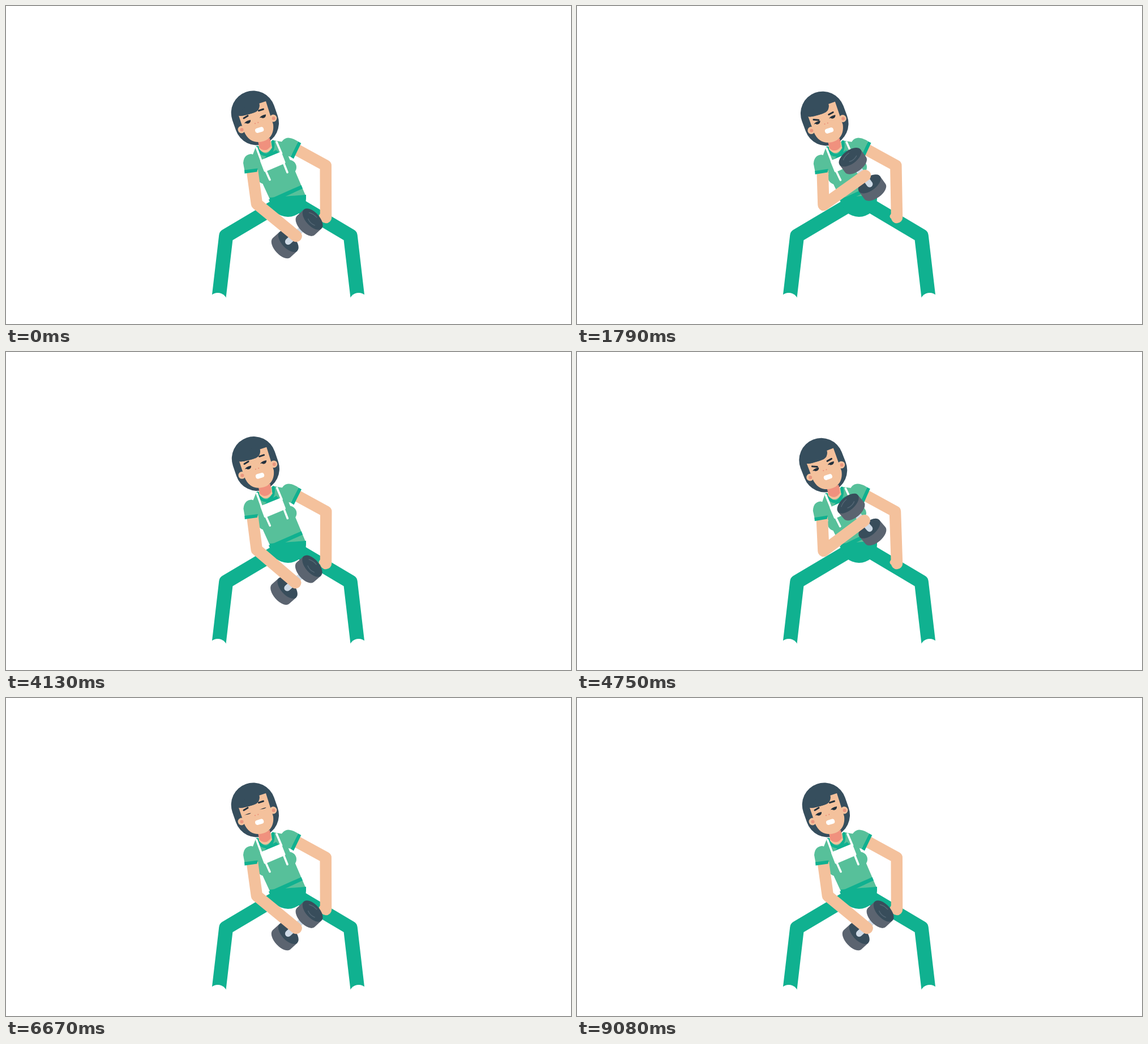
Write an HTML page that moves like this. It is 998x561 px and loops after 9960 ms.

```html
<!DOCTYPE html>
<html lang="en">
<head>
<meta charset="utf-8">
<title>Dumbbell curl</title>
<style>
  html, body { margin: 0; width: 100%; height: 100%; overflow: hidden; background: #fff; }
  svg { display: block; width: 998px; height: 561px; }
  .hair { fill: #364e5d; }
  .skin { fill: #f4c19c; }
  .shirt { fill: #57c09a; }
  .green { fill: #10b190; }
  .white { fill: #fff; }
  .limb { fill: none; stroke-linecap: round; stroke-linejoin: round; }
  .arm { stroke: #f4c19c; stroke-width: 20.5; }
  .leg { stroke: #10b190; stroke-width: 25; stroke-linecap: butt; }
  .strap { stroke: #fff; stroke-width: 3.6; }
  .brow { stroke: #24313d; stroke-width: 3; }
</style>
</head>
<body>
<svg viewBox="0 0 998 561">
  <defs>
    <g id="leg">
      <path class="limb leg" d="M376 514 388.7 405.5 484 349"/>
      <circle class="white" cx="374" cy="523" r="17"/>
    </g>
    <g id="weight">
      <path fill="#5b6470" d="M-23-8V8.5A23 12 0 0 0 23 8.5V-8z"/>
      <ellipse cy="-8" rx="23" ry="12" fill="#384d5b"/>
    </g>
    <path id="eye" fill="#24313d" d="M-6.8.8Q-4-3 5.5-2.4 5 2 .5 2.7-3 2.8-4 .7z"/>
  </defs>

  <use href="#leg"/>
  <use href="#leg" transform="matrix(-1 0 0 1 997 0)"/>

  <path id="farArm" class="limb arm"/>
  <path class="limb" stroke="#f4c19c" stroke-width="9" d="M562 364 557 371"/>

  <g class="body">
    <path class="shirt" d="M441 249 473 237 490 240 500 268 511 292 529 334 500 348 467 343 455 317 443 290 436 262z"/>
    <circle class="shirt" cx="457" cy="301" r="13"/>
    <circle class="shirt" cx="500" cy="284.5" r="13"/>
    <path class="green" d="M464 341.500 521.500 316 524 322 467 348z"/>
    <path class="green" d="M455 270 482 258.500 477 254 463 262z"/>
    <path class="shirt" d="M484 248Q487 233 499 232.500 507 233 516 239L502.500 266 490 262z"/>
    <path class="green" d="M516 239 521.300 242 508 269.500 502.500 266z"/>
    <path class="limb" stroke="#10b190" stroke-width="5" d="M444 249Q450 264 461.500 262.500 474 257 471.500 239"/>
    <path class="skin" d="M445 238 447 252Q459 266 470 250L467 234z"/>
    <path class="limb strap" d="M442.500 250 451 273M459 291 466 306.500M478 240 486.500 260M490 276 497 293.500"/>
    <path class="white" stroke="#fff" stroke-width="4" stroke-linejoin="round" d="M451 273.500 485 259.500 491.500 276 457.500 290.500z"/>
  </g>

  <path class="green" d="M466 338 530 333V340A32 32 0 0 1 466 340z"/>

  <g class="body">
    <path class="limb" stroke="#364e5d" stroke-width="78" d="M436.700 188.500 443 206.500"/>
    <path fill="#f0917e" d="M445 238 447.500 250Q459 260 468 247L466 233z"/>
    <path class="skin" d="M411 193.500 420 220C426 236 437 240.500 447 240 464 239 474 227 472 209L459 168 447 172Q450 185 437 188.500 418 195 411 193.500z"/>
    <path class="hair" d="M408 190 411 193.500Q417 195 425 191.500 443 189 446 180 449 177 447 171L440 165z"/>
    <circle class="skin" cx="416" cy="218" r="6.400"/>
    <circle class="skin" cx="472" cy="198" r="6.400"/>
    <circle fill="#e9967f" cx="416.500" cy="218.300" r="3"/>
    <circle fill="#e9967f" cx="472.700" cy="198.300" r="3"/>
    <use href="#eye" id="eyeL"/>
    <use href="#eye" id="eyeR"/>
    <path id="brows" class="limb brow"/>
    <circle fill="#ec8a76" cx="440" cy="207.200" r="1"/>
    <circle fill="#ec8a76" cx="445.300" cy="205.500" r="1"/>
    <rect class="white" x="-7.700" y="-4.200" width="15.400" height="8.400" rx="4" transform="translate(447.700 218.700) rotate(-17)"/>
  </g>

  <g id="dumbbell">
    <use href="#weight" x="-2.500" y="24.500"/>
    <path class="limb" stroke="#cfdbe7" stroke-width="11" d="M-2.500 17V-16"/>
    <use href="#weight" x="-2.500" y="-33.700"/>
    <path class="limb" stroke="#536674" stroke-width="1.500" d="M-15-45Q-9-49 0-49M-8-36Q0-33 8-37"/>
  </g>

  <path id="nearArm" class="limb arm"/>

  <g class="body">
    <path class="shirt" d="M421.500 291 419 277Q420 262 433 261 442 262 447 276L445 289z"/>
    <path class="green" d="M421 289.500 444.500 286.500 443.500 292.500 421.500 295.500z"/>
  </g>
</svg>

<script>
const LOOP = 9960, STEP = 1000 / 24;
const PIVOT = [498, 340], SWAY = -1.05, FOREARM = 90;
const RAD = Math.PI / 180;

// [start, duration, lifting]
const MOVES = [
  [730, 1040, true], [2190, 960, false],
  [4010, 960, true], [5390, 940, false],
  [6690, 1020, true], [8140, 940, false]
];
// Poses along a move: [progress, body sway, arm lift]
const UP = [[0, 0, 0], [.28, -1, -.04], [.74, 2, 1.02], [1, 1, 1]];
const DOWN = [[0, 1, 1], [.28, 2, 1.02], [.72, -1, .02], [.85, -.5, -.035], [1, 0, 0]];
const BLINKS = [77, 160], SQUASH = [.28, .22, .6];

const $ = id => document.getElementById(id);
const bodies = document.querySelectorAll('.body');
const mix = (a, b, k) => a + (b - a) * k;
const clamp = v => Math.min(1, Math.max(0, v));
const smooth = k => k * k * (3 - 2 * k);

function poseAt(t) {
  const move = MOVES.filter(m => m[0] <= t).pop();
  if (!move) return [0, 0];
  const keys = move[2] ? UP : DOWN;
  const u = clamp((t - move[0]) / move[1]);
  const i = Math.max(1, keys.findIndex(k => k[0] >= u));
  const a = keys[i - 1], b = keys[i];
  const k = smooth((u - a[0]) / (b[0] - a[0]));
  return [mix(a[1], b[1], k), mix(a[2], b[2], k)];
}

function onBody(x, y, deg) {
  const c = Math.cos(deg * RAD), s = Math.sin(deg * RAD);
  const dx = x - PIVOT[0], dy = y - PIVOT[1];
  return [PIVOT[0] + dx * c - dy * s, PIVOT[1] + dx * s + dy * c];
}

const limb = (id, ...pts) => $(id).setAttribute('d', 'M' + pts.join(' '));
const place = (id, x, y, rest) => $(id).setAttribute('transform', `translate(${x} ${y}) ${rest}`);

function draw(frame) {
  const [sway, lift] = poseAt(frame * STEP);
  const tilt = SWAY * sway;
  for (const g of bodies) g.setAttribute('transform', `rotate(${tilt} ${PIVOT})`);

  limb('farArm', onBody(508, 250.5, tilt), [564.7 - 1.4 * sway, 281.5], [565, 373]);

  const under = Math.min(0, sway);
  const elbow = [mix(443, 435.5, clamp(lift)) + under * .5, mix(349, 351, clamp(lift)) + under];
  const angle = mix(39.3, -35.3, lift) * RAD;
  const hand = [elbow[0] + FOREARM * Math.cos(angle), elbow[1] + FOREARM * Math.sin(angle)];
  limb('nearArm', onBody(434.5, 287, tilt), elbow, hand);

  const wrist = lift + .038 * Math.max(0, sway - 1) * clamp(lift);
  place('dumbbell', hand[0], hand[1], `rotate(${mix(47.4, -36, wrist)})`);

  const k = clamp(lift);
  const brow = (a, b) => a.map((v, i) => mix(v, b[i], k));
  const left = brow([420, 198, 427, 193.7], [420.5, 199, 429.3, 200]);
  const right = brow([446.5, 184.7, 454.5, 182], [447.5, 190.5, 455, 186.7]);
  $('brows').setAttribute('d', `M${left}M${right}`);

  const since = BLINKS.map(b => frame - b).find(d => d in SQUASH);
  const squash = since === undefined ? 1 : SQUASH[since];
  const lid = `rotate(-15) scale(1 ${squash})`;
  place('eyeL', 427.3, 204.7, lid);
  place('eyeR', 454.3, 195, lid);
}

function tick() {
  draw(Math.floor((performance.now() % LOOP + 5) / STEP));
  requestAnimationFrame(tick);
}
tick();
</script>
</body>
</html>
```
